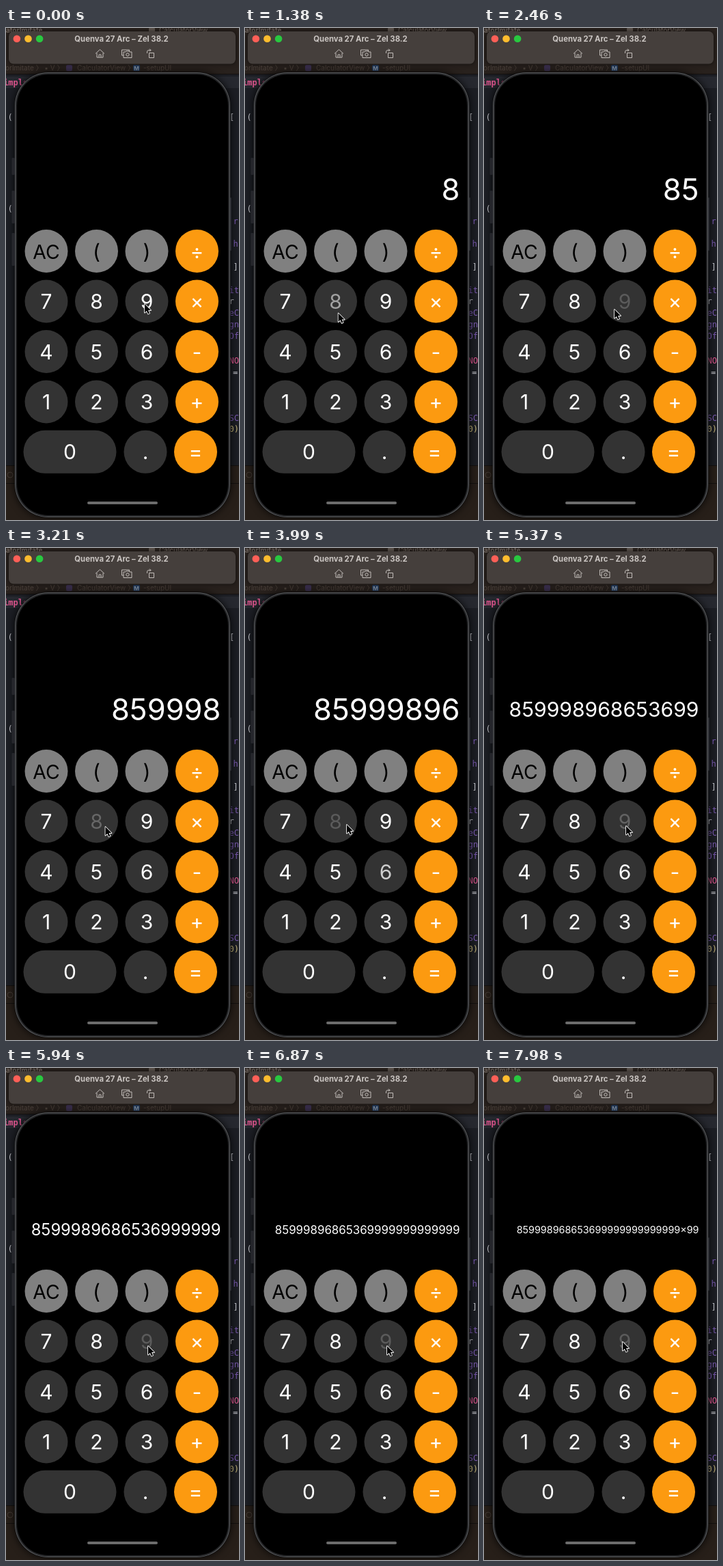
An HTML page with a canvas that plays this animation: 341x720 px, repeating every 8 s.

```html
<!DOCTYPE html>
<html lang="en">
<head>
<meta charset="utf-8">
<title>Calculator</title>
<style>
  html, body { margin: 0; width: 100%; height: 100%; overflow: hidden; background: #1c1e24; }
  canvas { display: block; width: 341px; height: 720px; }
</style>
</head>
<body>
<canvas id="stage"></canvas>
<script>
const W = 341, H = 720, LOOP = 8000;
const HOLD = 70, FADE = 300;
const SANS = 'Inter, Roboto, sans-serif';
const MONO = '"DejaVu Sans Mono", "Liberation Mono", monospace';
const canvas = document.getElementById('stage');
const ctx = canvas.getContext('2d');
const dpr = window.devicePixelRatio || 1;
canvas.width = W * dpr;
canvas.height = H * dpr;

// Key presses: time, key, pointer x, pointer y
const presses = [
  [1180, '8', 136, 406], [1800, '5', 140, 482],
  [2430, '9', 191, 412], [2610, '9', 191, 412], [2790, '9', 191, 412],
  [3120, '8', 144, 408], [3410, '9', 196, 408], [3710, '6', 200, 480],
  [3960, '8', 149, 405], [4230, '6', 197, 478], [4510, '5', 142, 480],
  [4770, '3', 194, 547], [4970, '6', 204, 480]
];
for (let i = 0; i < 14; i++) presses.push([5160 + 127 * i, '9', 208, 407]);
presses.push([7230, '×', 281, 408], [7560, '9', 203, 401],
  [7740, '9', 203, 401], [7950, '9', 203, 401]);

const COLS = [59, 132.5, 206, 279.5];
const ROWS = [326.5, 400, 473.5, 547];
const LABELS = [
  ['AC', '(', ')', '÷'], ['7', '8', '9', '×'],
  ['4', '5', '6', '-'], ['1', '2', '3', '+']
];
const GREY = '#808080', DARK = '#333333', ORANGE = '#fc9a10';
const SIZE = 63;
const keys = [];
LABELS.forEach((row, r) => row.forEach((label, c) => {
  const fill = c === 3 ? ORANGE : r === 0 ? GREY : DARK;
  keys.push({ label, x: COLS[c], y: ROWS[r], w: SIZE, fill, ink: fill === GREY ? '#000' : '#fff' });
}));
keys.push({ label: '0', x: 93.5, y: 620.3, w: 136, fill: DARK, ink: '#fff' });
keys.push({ label: '.', x: 204, y: 620.3, w: SIZE, fill: DARK, ink: '#fff' });
keys.push({ label: '=', x: 277.5, y: 620.3, w: SIZE, fill: ORANGE, ink: '#fff' });

function box(x, y, w, h, r, fill) {
  ctx.beginPath();
  ctx.roundRect(x, y, w, h, r);
  ctx.fillStyle = fill;
  ctx.fill();
}

function text(str, x, y, font, fill, align = 'left') {
  ctx.font = font;
  ctx.textAlign = align;
  ctx.fillStyle = fill;
  ctx.fillText(str, x, y);
}

function drawEditor() {
  box(0, 0, W, H, 0, '#1c1e24');
  box(0, 71, W, 17, 0, '#26282f');
  box(0, 0, W, 68, 0, '#28211d');
  box(0, 67, W, 1, 0, '#15110f');
  const small = '10px ' + SANS, dim = '#4b413b';
  text('atorImitate', 0, 7, 'bold ' + small, '#70665f');
  box(209, 0, 9, 6, 1, '#5d544e');
  text('CalculatorView', 224, 7, small, '#70665f');
  text('orImitate 〉 ▪ V 〉', -1, 62, small, dim);
  box(88, 54, 9, 9, 2, '#3c3150');
  text('CalculatorView 〉', 104, 62, small, dim);
  box(186, 54, 10, 9, 2, '#243c5e');
  text('M', 191, 62, 'bold 8px ' + SANS, '#8794a6', 'center');
  text('-setupUI', 201, 62, small, dim);
  box(0, 640, W, 80, 0, '#271f19');
  box(0, 640, W, 1, 0, '#14110f');
  box(0, 666, W, 1, 0, '#14110f');
  ctx.beginPath();
  ctx.arc(6, 654, 4, 0, Math.PI * 2);
  ctx.lineWidth = 1;
  ctx.strokeStyle = '#443b35';
  ctx.stroke();

  const code = '12px ' + MONO;
  const white = '#c9cad0', purple = '#7d5bb4', pink = '#e0568f';
  text('imple', -4, 84, 'bold ' + code, pink);
  text('(', 2.5, 135, code, white);
  text('(', 2.5, 269, code, white);
  const right = [
    ['[', 327, 135, white], ['r', 332.5, 287, purple], ['h', 332.5, 320, purple],
    [']', 332.5, 354, white], ['it', 326.5, 388, purple], ['r', 326.5, 404, white],
    ['eC', 326.5, 421, purple], ['gn', 326.5, 438, purple], ['Of', 326.5, 455, purple],
    ['NO', 326.5, 491, pink], ['=', 332, 508, white],
    ['SC', 326.5, 575, purple], ['0)', 326.5, 591, '#c8b97a']
  ];
  for (const [str, x, y, fill] of right) text(str, x, y, code, fill);
}

function drawPhone() {
  ctx.save();
  ctx.shadowColor = 'rgba(0,0,0,.8)';
  ctx.shadowBlur = 12 * dpr;
  box(12.5, 64.5, 316, 652, 49, '#0b0b0c');
  ctx.restore();
  for (const [y, h] of [[190, 25], [238, 48], [300, 48]]) box(8.5, y, 4, h, 1, '#26272d');
  box(328, 248, 2, 78, 1, '#26272d');
  box(13, 65, 315, 651, 48.5, '#5c5e60');
  box(14, 66, 313, 649, 47.5, '#252628');
  box(16, 68, 309, 645, 45.5, '#000');
  box(119, 693, 103, 4, 2, '#6c6c6c');
}

function drawTitleBar() {
  ctx.save();
  ctx.shadowColor = 'rgba(0,0,0,.6)';
  ctx.shadowBlur = 6 * dpr;
  box(4, 5, 332, 47.5, 7, '#453f3c');
  ctx.restore();
  ['#ff5f57', '#febc2e', '#28c840'].forEach((fill, i) => box(10.6 + 16.6 * i, 10.5, 10.6, 10.6, 5.3, fill));
  text('Quenva 27 Arc – Zel 38.2', 169, 19.5, 'bold 11.3px ' + SANS, '#cbc6c3', 'center');

  ctx.strokeStyle = '#c2bdb9';
  ctx.lineWidth = 1;
  ctx.lineJoin = 'round';
  ctx.stroke(new Path2D('M131 37.5 L137.5 31.5 L144 37.5 M133 36.5 V43 H142 V36.5 M136 43 V39 H139 V43'));
  ctx.stroke(new Path2D('M172 40 H169.5 V32 H180.5 V34 M172 35 H175 L176 33.8 H180 L181 35 H184 V43.5 H172 Z'));
  ctx.beginPath();
  ctx.arc(178, 39, 2.2, 0, Math.PI * 2);
  ctx.stroke();
  ctx.stroke(new Path2D('M209.5 36.5 H216.5 V43.5 H209.5 Z M206.5 37 V35 Q206.5 32.5 209 32.5 H212 M210 30.5 L212 32.5 L210 34.5'));
}

function keyAlpha(label, t) {
  let last = -Infinity;
  for (const [at, key] of presses) if (key === label && at <= t) last = at;
  const faded = Math.max(0, t - last - HOLD) / FADE;
  return Math.min(1, 0.2 + 0.8 * faded);
}

function drawKeys(t) {
  for (const k of keys) {
    box(k.x - k.w / 2, k.y - SIZE / 2, k.w, SIZE, SIZE / 2, k.fill);
    ctx.globalAlpha = keyAlpha(k.label, t);
    const size = k.label === 'AC' ? 28.5 : 30;
    text(k.label, k.x, k.y + 11, `${size}px ${SANS}`, k.ink, 'center');
    ctx.globalAlpha = 1;
  }
}

function drawDisplay(t) {
  const typed = presses.filter(p => p[0] + HOLD <= t).map(p => p[1]).join('');
  if (!typed) return;
  const room = Math.min(278, 297 - typed.length);
  ctx.font = '100px ' + SANS;
  const size = Math.min(43.5, 100 * room / ctx.measureText(typed).width);
  text(typed, 314.5, 236.5 + size * 0.36, `${size}px ${SANS}`, '#fff', 'right');
}

function pointerAt(t) {
  let from = [720 - HOLD, '', 203, 404];
  for (const to of presses) {
    if (t < to[0]) {
      const start = from[0] + HOLD, end = to[0] - 20;
      const p = Math.max(0, Math.min(1, (t - start) / (end - start)));
      const e = p * p * (3 - 2 * p);
      return [from[2] + (to[2] - from[2]) * e, from[3] + (to[3] - from[3]) * e];
    }
    from = to;
  }
  return [from[2], from[3]];
}

const ARROW = new Path2D('M0 0 V12.6 L2.9 9.9 L4.9 14.4 L7 13.4 L5.1 9.1 H9 Z');
function drawPointer(t) {
  const [x, y] = pointerAt(t);
  ctx.save();
  ctx.translate(x, y);
  ctx.lineWidth = 1.7;
  ctx.lineJoin = 'round';
  ctx.strokeStyle = '#fff';
  ctx.stroke(ARROW);
  ctx.fillStyle = '#000';
  ctx.fill(ARROW);
  ctx.restore();
}

function draw(now) {
  const t = now % LOOP;
  ctx.setTransform(dpr, 0, 0, dpr, 0, 0);
  drawEditor();
  drawPhone();
  drawTitleBar();
  drawKeys(t);
  drawDisplay(t);
  drawPointer(t);
}

let begin;
function tick(now) {
  begin ??= now;
  draw(now - begin);
  requestAnimationFrame(tick);
}
requestAnimationFrame(tick);
</script>
</body>
</html>
```
